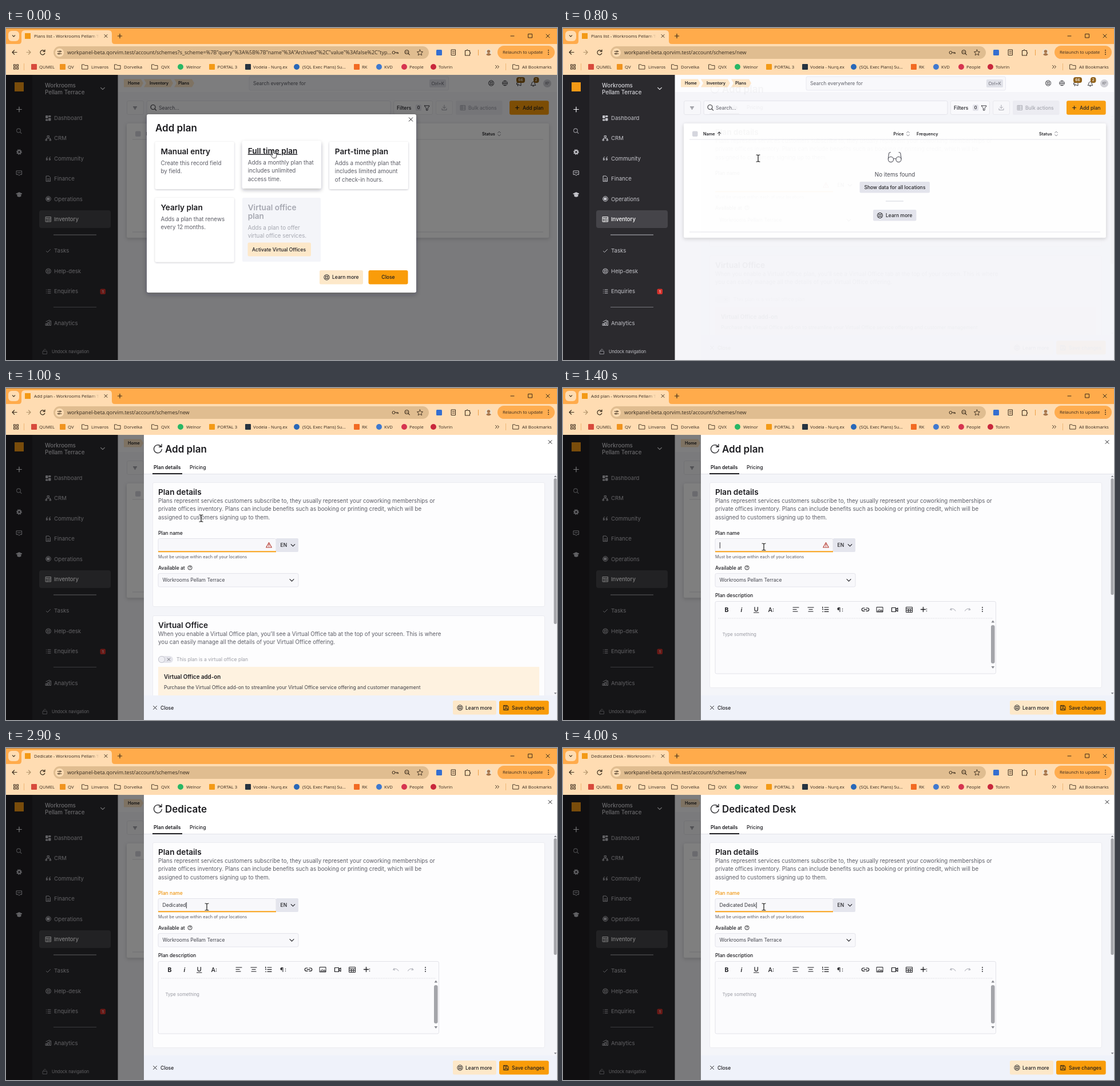
An HTML page that plays this animation: 963 px wide and 581 px high, repeating every 4200 ms.

```html
<!DOCTYPE html>
<html lang="en">
<head>
<meta charset="utf-8">
<title>Add plan</title>
<style>
html, body { margin: 0; width: 100%; height: 100%; overflow: hidden; background: #fff; }
svg { display: block; width: 963px; height: 581px; font-family: Inter, sans-serif; }
.ui { font-family: 'Open Sans', sans-serif; }
text { white-space: pre; }
</style>
</head>
<body>
<svg id="stage" viewBox="0 0 963 581" xmlns="http://www.w3.org/2000/svg"></svg>
<script>
const ORANGE = '#f99c0a', INK = '#1c1c20', GREY = '#5c5d66', PEACH = '#fde8c9', BAR = '#ffdcb2', THUMB = '#a4a5aa';

const rect = (x, y, w, h, fill, r = 0, more = '') =>
  `<rect x="${x}" y="${y}" width="${w}" height="${h}" rx="${r}" fill="${fill}" ${more}/>`;
const box = (x, y, w, h, fill, line, r = 2.5) =>
  rect(x + .5, y + .5, w - 1, h - 1, fill, r, `stroke="${line}" stroke-width=".8"`);
const disc = (x, y, r, fill, more = '') => `<circle cx="${x}" cy="${y}" r="${r}" fill="${fill}" ${more}/>`;
const ring = (x, y, r, line, w = 1) => disc(x, y, r, 'none', `stroke="${line}" stroke-width="${w}"`);
const path = (d, line = INK, w = 1, fill = 'none', more = '') =>
  `<path d="${d}" stroke="${line}" stroke-width="${w}" fill="${fill}" stroke-linecap="round" stroke-linejoin="round" ${more}/>`;
// y is the middle of the capitals
const text = (x, y, s, size = 8.54, weight = 400, fill = INK, more = '') =>
  `<text x="${x}" y="${(y + size * .36).toFixed(2)}" font-size="${size}" font-weight="${weight}" fill="${fill}" ${more}>${s}</text>`;
const lines = (x, y, list, size, weight, fill, gap = 14.6) =>
  list.map((s, i) => text(x, y + i * gap, s, size, weight, fill)).join('');
const ui = (x, y, s, size = 7.75, more = '') => text(x, y, s, size, 400, '#352a1e', 'class="ui" ' + more);
const group = (id, body, more = '') => `<g id="${id}" ${more}>${body}</g>`;
const chevron = (x, y, line = INK, s = 3) => path(`M${x - s} ${y - s / 2}l${s} ${s}l${s} ${-s}`, line, 1.1);
const cross = (x, y, s, line = INK, w = 1) => path(`M${x - s} ${y - s}l${2 * s} ${2 * s}m0 ${-2 * s}l${-2 * s} ${2 * s}`, line, w);
const plus = (x, y, s, line, w = 1.2) => path(`M${x - s} ${y}h${2 * s}M${x} ${y - s}v${2 * s}`, line, w);
const lens = (x, y, line, r = 3.6) => ring(x - 1, y - 1, r, line, 1.1) + path(`M${x + r - 2} ${y + r - 2}l2.6 2.6`, line, 1.1);
const buoy = (x, y, line = INK, r = 4.6) => ring(x, y, r, line) + ring(x, y, r * .45, line) +
  path([[1, 1], [1, -1], [-1, 1], [-1, -1]].map(([a, b]) => `M${x + a * r * .33} ${y + b * r * .33}L${x + a * r * .7} ${y + b * r * .7}`).join(''), line);
const folder = x => path(`M${x} 64h3.5l1.3 1.6h5.2v6.4h-10z`, '#4b3c2a', 1);
const sorter = x => path(`M${x - 2.4} 183.5l2.4-2.4l2.4 2.4M${x - 2.4} 186.5l2.4 2.4l2.4-2.4`, '#77777f', .9);

function chrome() {
  const k = '#3a2c1c';
  let s = rect(0, 0, 963, 82, BAR) + rect(0, 0, 963, 28, '#ffab4b') + rect(0, 0, 963, 1, '#a8763c');
  s += rect(4, 5, 19, 18, BAR, 6) + chevron(13.5, 14, k, 2.2);
  s += path('M22 28q5 0 5-5v-13q0-6 6-6h146q6 0 6 6v13q0 5 5 5z', 'none', 0, BAR);
  s += rect(33, 9, 10, 10, '#f39a16') + group('tab', ui(49, 14, '', 7.75, 'id="tabText"'), 'clip-path="url(#tabClip)"');
  s += rect(147, 8, 16, 12, 'url(#fade)');
  s += cross(174.5, 14, 2.5, k) + plus(199, 14, 3.6, k);
  s += path('M882 14h6', k) + path('M913 10.5h6.5v6.5h-6.5z', k) + cross(947, 14, 3, k);
  s += path('M19 42.5h-8m3.5-3.5l-3.5 3.5l3.5 3.5', k, 1.2) + path('M36 42.5h7m-3.5-3.5l3.5 3.5l-3.5 3.5', '#b3946c', 1.2);
  s += path('M67.5 41a4 4 0 1 0 .3 3M68 38v3.2h-3.2', k, 1.2);
  s += rect(83, 32, 656, 22, '#e0bd90', 11) + disc(93.5, 43, 7.5, BAR);
  s += path('M90 41h3m2.5 0h1.5M90 45h1.5m2.5 0h3', k) + ring(94.5, 41, 1.2, k) + ring(92.5, 45, 1.2, k);
  s += ui(107, 43, '', 9, 'id="url"');
  s += ring(677.5, 43, 2.4, k) + path('M680 43h5.5v1.8m-2-1.8v1.8', k) + lens(701.5, 43, k, 3.3) + path('M699 42h3', k, .8);
  s += path('M723.5 38l1.5 3.4l3.6.3l-2.7 2.4l.8 3.6l-3.2-1.9l-3.2 1.9l.8-3.6l-2.7-2.4l3.6-.3z', k, .9);
  s += rect(752, 38, 10, 10, '#356fd0', 1.5);
  s += path('M778.5 38h7v9.5h-7zM780 41h4M780 44h4', k) + path('M802.5 39.5h2.5q1-3 2.5 0h3v3q2.5 1.2 0 2.5v3h-8z', k, 1.1);
  s += rect(825, 38, 1, 10, '#ef9e42') + disc(843.5, 42.5, 6, '#f0e2cc') + disc(843.5, 41, 2.8, '#a9764b') + path('M839 46.500q4.500-5.500 9 0q-4.500 4-9 0z', 'none', 0, '#a9764b');
  s += rect(859, 31, 100, 23, '#ffad50', 11.5) + ui(868, 42.5, 'Relaunch to update') + [39, 42.5, 46].map(y => disc(948, y, .9, k)).join('');
  for (const x of [13.5, 18.5]) for (const y of [64, 69]) s += rect(x, y, 3, 3, 'none', 0, `stroke="${k}"`);
  s += rect(31, 62, 1, 12, '#efb777');
  [[44, '#d84a3c'], [94, '#f0941f'], [355, '#f39a16'], [418, '#263340'], [608, '#f26a22']].forEach(([x, c]) => s += rect(x, 63, 10, 10, c, 1));
  [[305, '#29b765'], [508, '#2968b8'], [652, '#3f79cf'], [696, '#d6354f'], [747, '#c8283c']].forEach(([x, c]) => s += disc(x, 68, 5, c));
  [133, 190, 255, 886].forEach(x => s += folder(x));
  [[58, 'QUMEL'], [108, 'QV'], [149, 'Linvaros'], [206, 'Dorvelka'], [271, 'QVX'], [315, 'Welnor'], [369.5, 'PORTAL 3'],
   [432, 'Vodela - Nurq.ex'], [518, '(SQL Exec Plans) Su...'], [622, 'RK'], [661, 'KVD'], [705, 'People'], [756, 'Tolvrin'], [902, 'All Bookmarks']]
    .forEach(([x, t]) => s += ui(x, 68, t));
  return s + path('M855.5 65.5l2.5 2.5l-2.5 2.5m3.5-5l2.5 2.5l-2.5 2.5', k) + rect(873, 62, 1, 12, '#efb777');
}

const navIcons = {
  Dashboard: 'M70 153.5h3v4h-3zM75 153.5h3v2h-3zM75 158h3v4h-3zM70 160h3v2h-3z',
  CRM: 'M72.5 188.5h3v2.5h-3zM74 191v2M70.5 195v-2h7v2M69.5 195h2v2h-2zM76.5 195h2v2h-2z',
  Community: 'M70.5 231v-2.5q0-2 2-3M72.5 229v2h-2v-2zM75.5 231v-2.5q0-2 2-3M77.5 229v2h-2v-2z',
  Finance: 'M70.5 259h4.5l2.5 2.5v7h-7zM72 264h4M72 266.5h4',
  Operations: 'M72 297h4v4h-4z',
  Inventory: 'M69.5 330.5h9v8.5h-9zM69.5 333h9M72 333v6M74 335h3M74 337h3',
  Tasks: 'M70.5 390.5l2 2l5-5',
  Enquiries: 'M70.5 458h.1M70.5 461h.1M70.5 464h.1M73 458h5M73 461h5M73 464h5',
  Analytics: 'M69.5 520.5h2v-3h-2zM73 520.5h2v-5h-2zM76.5 520.5h2v-8h-2zM70 514l6-3'
};

function sidebar() {
  const c = '#c4c4ca', w = '#f2f2f5';
  let s = rect(0, 82, 46, 499, '#201f23') + rect(46, 82, 149.5, 499, '#2b2a2e') + rect(15, 95, 16, 16, '#f39a16');
  s += plus(23, 142.5, 4.3, w, 1.2) + lens(23, 180.5, '#96969c', 3.4);
  s += disc(23, 217, 2.7, 'none', `stroke="${c}" stroke-width="2"`) + disc(23, 217, 4.2, 'none', `stroke="${c}" stroke-width="1.3" stroke-dasharray="1.7 1.6"`);
  s += path('M18.5 250h9v6.5h-3l-1.5 1.8l-1.5-1.8h-3zM20.5 253.3h5', c);
  s += path('M18 290l5-2.3l5 2.3l-5 2.3zM20 292v2.5q3 1.6 6 0v-2.5', c, 1, c);
  s += lines(68, 100, ['Workrooms', 'Pellam Terrace'], 9.76, 500, '#d4d4d9', 12) + chevron(169, 106, w, 3.4);
  s += rect(58, 319, 125, 31, '#454449', 4);
  [['Dashboard', 157.5], ['CRM', 193], ['Community', 228.5], ['Finance', 264], ['Operations', 299.5], ['Inventory', 334.5],
   ['Tasks', 390], ['Help-desk', 425.5], ['Enquiries', 461], ['Analytics', 516.5]].forEach(([t, y]) => {
    const on = t === 'Inventory', col = on ? '#fff' : c;
    s += text(84, y, t, on ? 9.5 : 9.6, on ? 500 : 400, col);
    if (navIcons[t]) s += path(navIcons[t], col, 1, t === 'Dashboard' || t === 'Operations' ? col : 'none');
  });
  s += ring(74, 299, 4.4, c) + buoy(74, 425.5, c, 4.4);
  s += rect(83, 361.5, 75, 1, '#b9b9bf') + rect(83, 488, 75, 1, '#77777d');
  s += rect(164.5, 456.5, 9.5, 9.5, '#d4322c', 2) + text(169.3, 461.3, '1', 6.5, 500, '#fff', 'text-anchor="middle"');
  return s + path('M64.5 565.5h7v5h-7zM66 565.5v-2q2-3 4 0', '#8e8e94') + text(80, 566, 'Undock navigation', 7.4, 400, c);
}

function page() {
  let s = rect(195.5, 82, 767.5, 499, '#f5f5f9') + rect(195.5, 82, 767.5, 30, '#fcfcfe');
  [[206, 34], [241, 51], [294, 35]].forEach(([x, w]) => s += path(`M${x} 89.5h${w - 4}l4 7l-4 7h${4 - w}l${x > 210 ? 4 : 0}-7z`, 'none', 0, '#fde6c6'));
  s += text(213, 96.5, 'Home', 7.3, 600) + text(251, 96.5, 'Inventory', 7.2, 600) + text(301, 96.5, 'Plans', 7.3, 600);
  s += box(424.5, 84.5, 349.5, 25, '#f8f8fb', '#e4e4ec') + text(432, 97, 'Search everywhere for', 8.54, 400, GREY);
  s += rect(740, 90, 29, 14, '#dfe0e8', 2) + text(754.5, 97, 'Ctrl+K', 7.3, 400, GREY, 'text-anchor="middle"');
  s += buoy(848, 96.5, '#333338') + ring(872, 96.5, 4.3, '#333338') + path('M868 96.5h8M872 92.5q-3.5 4 0 8q3.5-4 0-8', '#333338', .8);
  s += path('M893 96h2l5-2v7l-5-2h-2zM894.5 99v2.5', '#333338') + path('M917.5 100q1.5-1.5 1.5-4q2.5-4 5 0q0 2.5 1.5 4zM920.5 101.8h2', '#333338');
  s += rect(892, 86, 15, 10, '#8c5b10', 4) + text(899.5, 91, '66', 6.8, 500, '#fff', 'text-anchor="middle"');
  s += rect(922, 86, 9.5, 10, '#8c5b10', 4) + text(926.7, 91, '2', 6.8, 500, '#fff', 'text-anchor="middle"');
  s += disc(946, 97, 7, '#cfcfd5') + text(946, 97, 'KP', 5.5, 400, '#66666d', 'text-anchor="middle"');
  s += box(211, 127, 30, 25, '#f7f7fa', '#e2e2e9') + path('M222.5 138h6M223.8 140h3.4M225 142h1', '#55565e');
  s += box(245.5, 127, 427, 25, '#f9f9fc', '#e0e0e8') + lens(258, 139.5, '#333338', 4) + text(267, 139.5, 'Search...', 8.54, 400, GREY);
  s += box(677, 127, 69, 25, '#f9f9fc', '#e2e2e9') + text(683, 139.5, 'Filters', 8.6, 500) + rect(716, 134, 10, 11, '#e3e3ea', 2) + text(721, 139.5, '0', 7.3, 500, INK, 'text-anchor="middle"');
  s += path('M731.5 136h8.5q0 2-3 4v4h-2.5v-4q-3-2-3-4z', '#333338');
  s += box(751, 127, 30, 25, '#f7f7fa', '#e6e6ec') + path('M766 135v5.5m-2.5-2.3l2.5 2.5l2.5-2.5M762 141v2.5h8v-2.5', '#a3a4ad');
  s += rect(786, 127, 81.5, 25, '#ececf2', 2.5) + path('M794.5 135.5h8v8h-8zM794.5 138h8M794.5 140.7h8M797 135.5v8', '#a3a4ad', .9) + text(808, 139.5, 'Bulk actions', 8.54, 500, '#a3a4ad');
  s += rect(880, 127.3, 68.7, 24.4, ORANGE, 3) + plus(893.5, 139.5, 3, INK) + text(903, 139.5, 'Add plan', 8.6, 500);
  s += rect(211, 167, 738, 200, '#fff', 3, 'filter="url(#soft)"') + rect(226, 180.5, 9.5, 9.5, '#d5d6de', 2);
  s += text(245, 185, 'Name', 7.32, 600) + path('M273 188v-6m-2.7 2.7l2.7-2.7l2.7 2.7') + text(577.5, 185, 'Price', 7.32, 600) + sorter(603);
  s += text(618, 185, 'Frequency', 7.32, 600) + text(832, 185, 'Status', 7.32, 600) + sorter(862);
  s += rect(221, 194.5, 718, 1, '#e4e4ea') + rect(221, 356.5, 718, 1, '#e4e4ea');
  s += ring(573, 230, 4.6, GREY, 1.2) + ring(586.5, 230, 4.6, GREY, 1.2) + path('M577.6 229q2.2-1 4.3 0M568.3 229l1.2-9q.4-2.5 3-2.5M591.2 229l-1.200-9q-.4-2.500-3-2.500', GREY, 1.2);
  s += text(580, 256.5, 'No items found', 9.78, 400, '#44454d', 'text-anchor="middle"');
  s += rect(518.5, 269, 122.5, 19.5, '#e3e4ec', 2) + text(580, 278.7, 'Show data for all locations', 8.5, 500, INK, 'text-anchor="middle"');
  s += rect(564, 302.5, 31, 1, '#d2d3db') + rect(542, 318, 75.5, 19.5, '#e3e4ec', 2);
  return s + buoy(554, 328) + text(564, 328, 'Learn more', 8.54, 500);
}

const card = (id, x, y, h, title, body) => group(id,
  rect(x, y, 138, h, '#fff', 2.5, 'filter="url(#card)"') + text(x + 9.8, y + 17, title, 13.6, 600) + lines(x + 9.8, y + 37.3, body, 9.8, 400, GREY, 14.5));

function modal() {
  const pale = '#a6a8b1';
  let s = rect(246, 151, 471, 312, '#fff', 3, 'filter="url(#deep)"') + text(261, 175, 'Add plan', 17, 600) + cross(707.5, 160, 3.2);
  s += card('manual', 260.7, 199, 83, 'Manual entry', ['Create this record field', 'by field.']);
  s += card('full', 412.9, 199, 83, 'Full time plan', ['Adds a monthly plan that', 'includes unlimited', 'access time.']);
  s += card('part', 565, 199, 83, 'Part-time plan', ['Adds a monthly plan that', 'includes limited amount', 'of check-in hours.']);
  s += card('year', 260.7, 297, 112.5, 'Yearly plan', ['Adds a plan that renews', 'every 12 months.']);
  s += rect(413, 297, 137, 112, '#f4f5f9', 2.5) + lines(422.7, 314, ['Virtual office', 'plan'], 13.6, 600, pale, 15) + lines(422.7, 349, ['Adds a plan to offer', 'virtual office services.'], 9.8, 400, pale, 14.5);
  s += rect(422.5, 375.5, 110.5, 24, PEACH, 2.5) + text(430, 387.5, 'Activate Virtual Offices', 8.54, 500);
  s += rect(548, 424, 76, 24.5, PEACH, 2.5) + buoy(560.5, 436.3) + text(570, 436.3, 'Learn more', 8.54, 500);
  return s + rect(633.5, 424, 69, 24.5, ORANGE, 3) + text(668, 436.3, 'Close', 8.6, 500, INK, 'text-anchor="middle"');
}

function editor() {
  let s = box(256, 165, 686, 360, '#fdfdfe', '#e8e8ee') + text(266, 363, 'Plan description', 8.6, 500);
  s += box(265.5, 373, 491.5, 127.5, '#fbfbfd', '#dcdce4') + path('M272 403h478', '#c9c9d2', .8, 'none', 'stroke-dasharray=".5 2.5"');
  s += text(286, 388, 'B', 10.5, 700, INK, 'text-anchor="middle"') + text(312, 388, 'i', 10.5, 600, INK, 'text-anchor="middle" font-style="italic"');
  s += path('M335 383.5v4q0 3 2.7 3t2.7-3v-4M333.5 393h8.5', INK, 1.2) + text(358.5, 388, 'A', 10.5, 500) + text(366, 388, ':', 9, 700);
  s += path('M402 384h10M402 387.5h6M402 391h8', INK, 1.2) + path('M428 384h10M430 387.5h6M429 391h8', INK, 1.2);
  s += path('M457 384h7M457 387.7h7M457 391.3h7M453.7 383v2.5M453.5 387.7h1M453.5 391.5h1', INK, 1.2);
  s += text(479, 388, '¶', 10.5, 500) + text(487, 388, ':', 9, 700);
  s += path('M527 385h-2q-2.7 0-2.7 2.7t2.7 2.7h2M530 385h2q2.7 0 2.7 2.7t-2.7 2.7h-2M526 387.7h5', INK, 1.2);
  s += path('M548.5 383.5h10.5v8.5h-10.5zM550 390.5l2.7-3l2 2l1.5-1.5l2 2.5z') + path('M574.5 384.5h7v7h-7zM582 387l3-2v6l-3-2z', INK, 1.2);
  s += path('M600 383.5h10.5v9h-10.5zM600 386.5h10.5M600 389.5h10.5M603.5 386.5v6M607 386.5v6') + plus(629.5, 387.5, 4, INK, 1.3) + text(634, 388, ':', 9, 700);
  s += path('M678.5 385.5l-2 2.5l3 .6M677 388q5-4 9 2', '#b4b5bd', 1.1) + path('M710 385.5l2 2.5l-3 .6M711.5 388q-5-4-9 2', '#b4b5bd', 1.1);
  s += [384, 387.5, 391].map(y => disc(733, y, .9, INK)).join('') + text(278.5, 431, 'Type something', 7.85, 400, '#9a9ba3');
  return s + path('M748.5 410.5l2.8-4l2.8 4z', 'none', 0, '#85868d') + rect(748, 415, 6.6, 67, THUMB, 3) + path('M748.5 487l2.8 4l2.8-4z', 'none', 0, '#85868d');
}

function addon() {
  let s = box(256, 165, 686, 218, '#fdfdfe', '#e8e8ee') + box(256, 398, 686, 160, '#fdfdfe', '#e8e8ee');
  s += text(266, 415, 'Virtual Office', 13.6, 600) + lines(266, 430, ['When you enable a Virtual Office plan, you’ll see a Virtual Office tab at the top of your screen. This is where', 'you can easily manage all the details of your Virtual Office offering.'], 9.76, 400, GREY);
  s += rect(266, 469, 26, 12, '#e4e4eb', 6) + disc(272, 475, 5.6, '#eeeef3', 'stroke="#b9bac3" stroke-width=".8"') + cross(284.5, 475, 2.3, '#6d6e77');
  s += text(298, 475, 'This plan is a virtual office plan', 8.54, 400, '#9c9da5') + rect(266, 488, 666, 60, '#fef2e0');
  return s + text(276, 505.5, 'Virtual Office add-on', 9.76, 600) + text(276, 524, 'Purchase the Virtual Office add-on to streamline your Virtual Office service offering and customer management', 8.54, 400, '#3d3e45');
}

function drawer() {
  let s = rect(241, 82, 722, 499, '#f4f5f9') + rect(241, 82, 722, 68.5, '#fff') + rect(241, 150, 722, 1, '#e2e2e9');
  s += path('M271 102.5a7 7 0 1 0 1.3 5M272 98.5v4.5h-4.5', INK, 1.3) + text(278, 107, '', 17, 600, INK, 'id="title"');
  s += cross(951, 94.5, 2.9) + text(258, 139, 'Plan details', 8.54, 600) + text(321, 139, 'Pricing', 8.54, 500) + rect(256, 149, 52, 2, INK);
  s += group('addon', addon()) + group('editor', editor());
  s += text(266, 182, 'Plan details', 13.6, 600);
  s += lines(266, 197.3, ['Plans represent services customers subscribe to, they usually represent your coworking memberships or', 'private offices inventory. Plans can include benefits such as booking or printing credit, which will be', 'assigned to customers signing up to them.'], 9.76, 400, GREY);
  s += text(266, 253.5, 'Plan name', 8.6, 500, INK, 'id="label"') + box(265.5, 263, 207, 24, '#f8f8fb', '#dedee6') + rect(266, 285.4, 206, 1.9, ORANGE);
  s += group('warn', path('M459.5 270.5l4.8 8.5h-9.6z', '#b5362c', 1.1) + path('M459.5 273.5v2.5M459.5 277.6v.1', '#b5362c', 1.1));
  s += rect(472, 263, 39, 24, '#e4e5ed', 2) + text(479.5, 275.3, 'EN', 8.54, 500) + chevron(501.5, 275.3, INK, 3.3);
  s += text(273.5, 275.3, '', 8.54, 400, '#33343a', 'id="field"') + rect(274, 270, .9, 10.5, INK, 0, 'id="caret"');
  s += text(266, 295, 'Must be unique within each of your locations', 7.32, 400, GREY) + text(266, 314.5, 'Available at', 8.54, 500);
  s += ring(321.5, 314.5, 3.6, INK, .9) + text(321.5, 314.5, '?', 5.8, 600, INK, 'text-anchor="middle"');
  s += box(265.5, 324, 246, 24.5, '#f8f8fb', '#dedee6') + text(273.5, 336.3, 'Workrooms Pellam Terrace', 8.54, 400, '#44454d') + chevron(499.5, 336.3, INK, 3.5);
  s += path('M957.8 156l2.3-3l2.3 3z', 'none', 0, '#85868d') + rect(957.5, 158, 5, 255, THUMB, 2.5, 'id="thumb"') + path('M957.8 533l2.3 3l2.3-3z', 'none', 0, '#85868d');
  s += rect(241, 538, 722, 43, '#eff2fa') + cross(260.5, 559.5, 2.9) + text(270, 559.5, 'Close', 8.54, 500);
  s += rect(781, 547, 76, 24.5, PEACH, 2.5) + buoy(793.5, 559.5) + text(803, 559.5, 'Learn more', 8.54, 500);
  s += rect(862, 547.2, 86.7, 24.4, ORANGE, 3) + path('M870 555.5h6l2 2v6h-8zM872 555.5v2.5h3.5v-2.5M872 563.5v-3h4v3');
  return s + text(884, 559.5, 'Save changes', 8.54, 500);
}

const cursors = group('hand', path('M-2.6-6q1.4-1.7 2.5 0v4l4 .9q1.4.4 1.1 1.8l-.8 4.3q-.3 1.5-1.6 1.5h-3.4q-1 0-1.6-.9l-3-4.2q-.4-1.3.9-1.3l1.9 1.2z', INK, .9, '#fff')) +
  group('arrow', path('M0 0v10l2.4-2.2l1.6 3.6l1.5-.7l-1.6-3.5h3.2z', INK, .8, '#fff')) +
  group('beam', ['#fff', '#111'].map((c, i) => path('M-3-6q3 0 3 1q0-1 3-1M0-5v10M-3 6q3 0 3-1q0 1 3 1', c, i ? 1.2 : 2.6)).join(''));

const shadow = (id, dy, blur, a) =>
  `<filter id="${id}" x="-20%" y="-20%" width="140%" height="150%"><feDropShadow dx="0" dy="${dy}" stdDeviation="${blur}" flood-color="#20202c" flood-opacity="${a}"/></filter>`;
document.getElementById('stage').innerHTML =
  `<defs>${shadow('soft', 2, 3, .18)}${shadow('card', 1, 1.8, .25)}${shadow('lift', 3, 3.2, .3)}${shadow('deep', 3, 5, .3)}
  <clipPath id="tabClip">${rect(48, 4, 115, 20, '#000')}</clipPath>
  <linearGradient id="fade"><stop stop-color="${BAR}" stop-opacity="0"/><stop offset="1" stop-color="${BAR}"/></linearGradient></defs>` +
  page() + sidebar() + rect(0, 82, 963, 499, '#000', 0, 'id="shade"') + group('modal', modal()) + group('drawer', drawer()) + chrome() + cursors;

const el = id => document.getElementById(id);
const show = (id, on) => el(id).setAttribute('visibility', on ? 'visible' : 'hidden');
const write = (id, s) => { if (el(id).textContent !== s) el(id).textContent = s; };
const ease = p => (1 - Math.cos(Math.PI * Math.min(1, Math.max(0, p)))) / 2;
const HOST = 'workpanel-beta.qorvim.test/account/schemes';
const QUERY = '?s_scheme=%7B"query"%3A%5B%7B"name"%3A"Archived"%2C"value"%3Afalse%2C"typ...';
const NAME = 'Dedicated Desk';
// keystroke times in tenths of a second
const KEYS = [18, 20, 21, 22, 24, 25, 26, 28, 29, 32, 33, 34, 35, 37];
const typed = k => NAME.slice(0, KEYS.filter(t => t <= k).length);

function hover(id, on) {
  const g = el(id);
  g.setAttribute('transform', `translate(0 ${on ? -1.3 : 0})`);
  g.querySelector('rect').setAttribute('filter', on ? 'url(#lift)' : 'url(#card)');
  g.querySelector('text').setAttribute('text-decoration', on ? 'underline' : 'none');
}

function draw(ms) {
  const k = Math.floor(ms / 100);
  const inModal = k < 8;
  const fade = inModal ? 0 : k === 8 ? .03 : k === 9 ? .6 : 1;
  const p = ease(k / 5), q = ease((k - 10) / 4);
  const x = inModal ? 468 - 129 * p : 341 + 10 * q;
  const y = inModal ? 221 + 7 * p : 228 + 50 * q;

  const overFull = inModal && x > 413, overManual = inModal && x < 399;
  hover('full', overFull);
  hover('manual', overManual);
  const kind = !inModal ? 'beam' : overFull || overManual ? 'hand' : 'arrow';
  for (const id of ['hand', 'arrow', 'beam']) {
    show(id, id === kind);
    el(id).setAttribute('transform', `translate(${x.toFixed(2)} ${y.toFixed(2)})`);
  }

  show('modal', inModal);
  show('drawer', !inModal);
  el('drawer').setAttribute('opacity', fade);
  el('shade').setAttribute('opacity', inModal ? .5 : k === 8 ? 0 : .5 * fade);

  const focus = k >= 14, entry = typed(k), heading = (typed(k - 1) || 'Add plan').trim();
  for (const [id, on] of [['editor', focus], ['addon', !focus], ['caret', focus], ['warn', !entry]])
    el(id).style.display = on ? '' : 'none';
  el('thumb').setAttribute('height', focus ? 204 : 255);
  el('label').setAttribute('fill', entry ? '#f0960f' : INK);
  write('field', entry);
  el('caret').setAttribute('x', 273.8 + el('field').getComputedTextLength());
  write('title', heading);
  write('tabText', (k < 9 ? 'Plans list' : heading) + ' - Workrooms Pellam Terrace');
  write('url', inModal ? HOST + QUERY : HOST + '/new');
}

function tick() {
  draw(performance.now() % 4200);
  requestAnimationFrame(tick);
}
tick();
</script>
</body>
</html>
```
